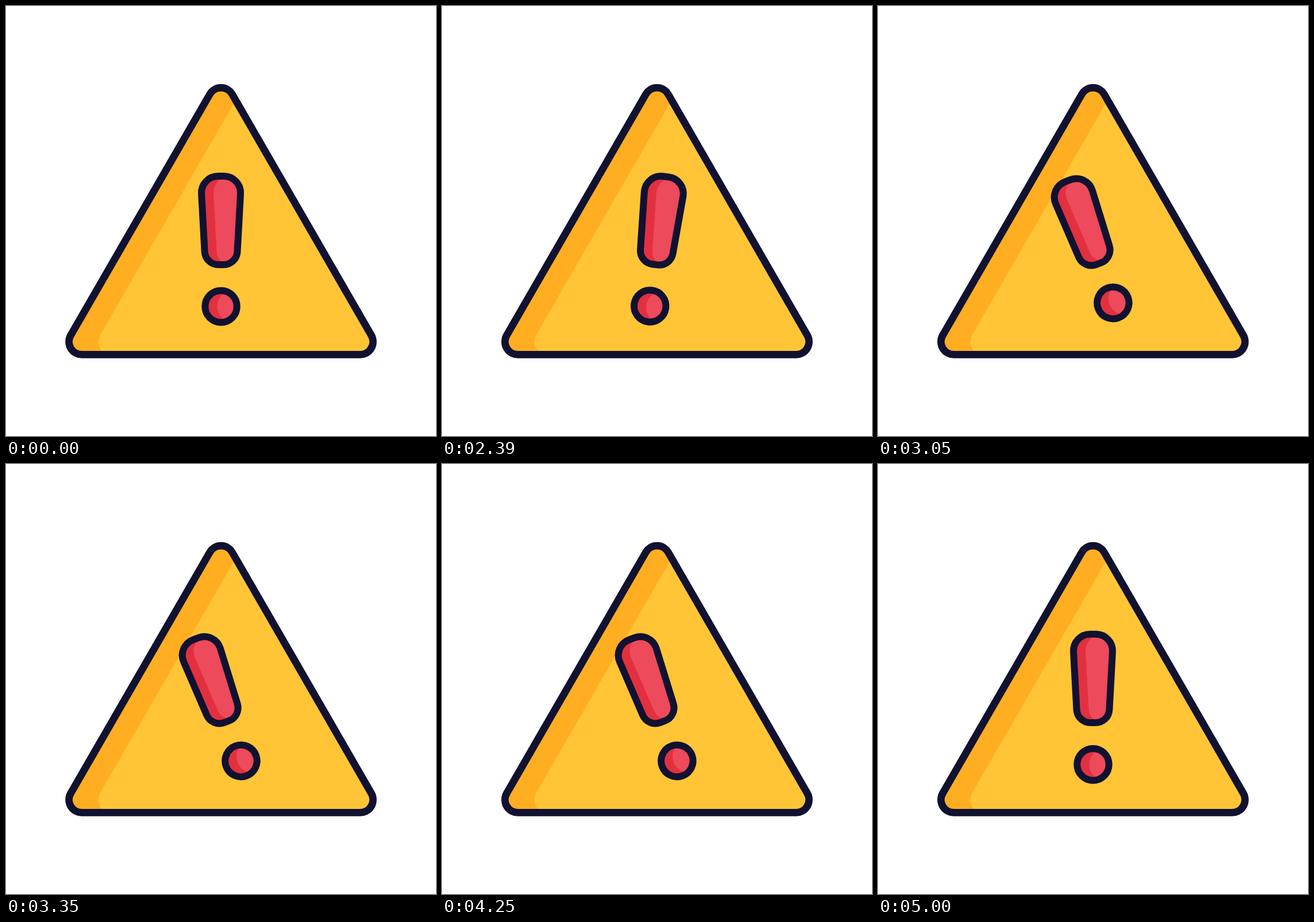
An HTML page with a canvas for the animation above (5.03 s loop, 748 by 748 pixels).

```html
<!DOCTYPE html>
<html lang="en">
<head>
<meta charset="utf-8">
<title>Warning</title>
<style>
  html, body { margin: 0; width: 100%; height: 100%; overflow: hidden; background: #fff; }
  canvas { display: block; }
</style>
</head>
<body>
<canvas id="stage" width="748" height="748"></canvas>
<script>
const ctx = document.getElementById('stage').getContext('2d');
const LOOP = 5030, START = 2000, STEP = 30;
const CX = 374, PIVOT_Y = 422, SWING = 29.2;
const FIRST = 6, HALF = 5, LAST = 81, END = 100; // in steps after START

// Corners are [x, y, radius]
function rounded(corners) {
  const path = new Path2D();
  const [[x0, y0], [x1, y1]] = corners;
  path.moveTo((x0 + x1) / 2, (y0 + y1) / 2);
  corners.forEach((_, i) => {
    const [x, y, r] = corners[(i + 1) % corners.length];
    const [nx, ny] = corners[(i + 2) % corners.length];
    path.arcTo(x, y, nx, ny, r);
  });
  path.closePath();
  return path;
}

const sign = rounded([[374, 119.7, 22.4], [654.8, 606.4, 22.4], [93.2, 606.4, 22.4]]);
const bar = rounded([[338.4, 296, 29], [409.6, 296, 29], [401.2, 450, 24], [346.8, 450, 24]]);
const dot = new Path2D();
dot.arc(CX, 522.7, 27.7, 0, 2 * Math.PI);

// Outlined shape with a shaded left side
function draw(path, shade, light, shift, line) {
  ctx.save();
  ctx.clip(path);
  ctx.fillStyle = shade;
  ctx.fill(path);
  ctx.translate(shift, 0);
  ctx.fillStyle = light;
  ctx.fill(path);
  ctx.restore();
  ctx.lineWidth = line;
  ctx.strokeStyle = '#111130';
  ctx.stroke(path);
}

// Cubic bezier easing (x1, 0, x2, 1)
const bezier = (x1, x2) => u => {
  let lo = 0, hi = 1;
  for (let i = 0; i < 24; i++) {
    const s = (lo + hi) / 2, q = 1 - s;
    if (3 * q * s * (q * x1 + s * x2) + s ** 3 < u) lo = s; else hi = s;
  }
  return lo * lo * (3 - 2 * lo);
};
const start = bezier(1 / 3, 2 / 3);
const shake = bezier(1 / 6, 5 / 6);
const settle = bezier(1 / 3, 0.18);

function angle(k) {
  if (k <= 0 || k >= END) return 0;
  if (k < FIRST) return -SWING * start(k / FIRST);
  if (k >= LAST) return SWING * (1 - settle((k - LAST) / (END - LAST)));
  const n = Math.floor((k - FIRST) / HALF);
  const a = SWING * (2 * shake((k - FIRST) / HALF - n) - 1);
  return n % 2 ? -a : a;
}

function frame() {
  const t = performance.now() % LOOP;
  ctx.clearRect(0, 0, 748, 748);
  draw(sign, '#ffae22', '#ffc536', 51, 12.8);
  ctx.save();
  ctx.translate(CX, PIVOT_Y);
  ctx.rotate(angle(Math.floor((t - START) / STEP)) * Math.PI / 180);
  ctx.translate(-CX, -PIVOT_Y);
  draw(bar, '#e3303f', '#ed4a5b', 21, 12);
  draw(dot, '#e3303f', '#ed4a5b', 21, 12);
  ctx.restore();
  requestAnimationFrame(frame);
}
frame();
</script>
</body>
</html>
```
